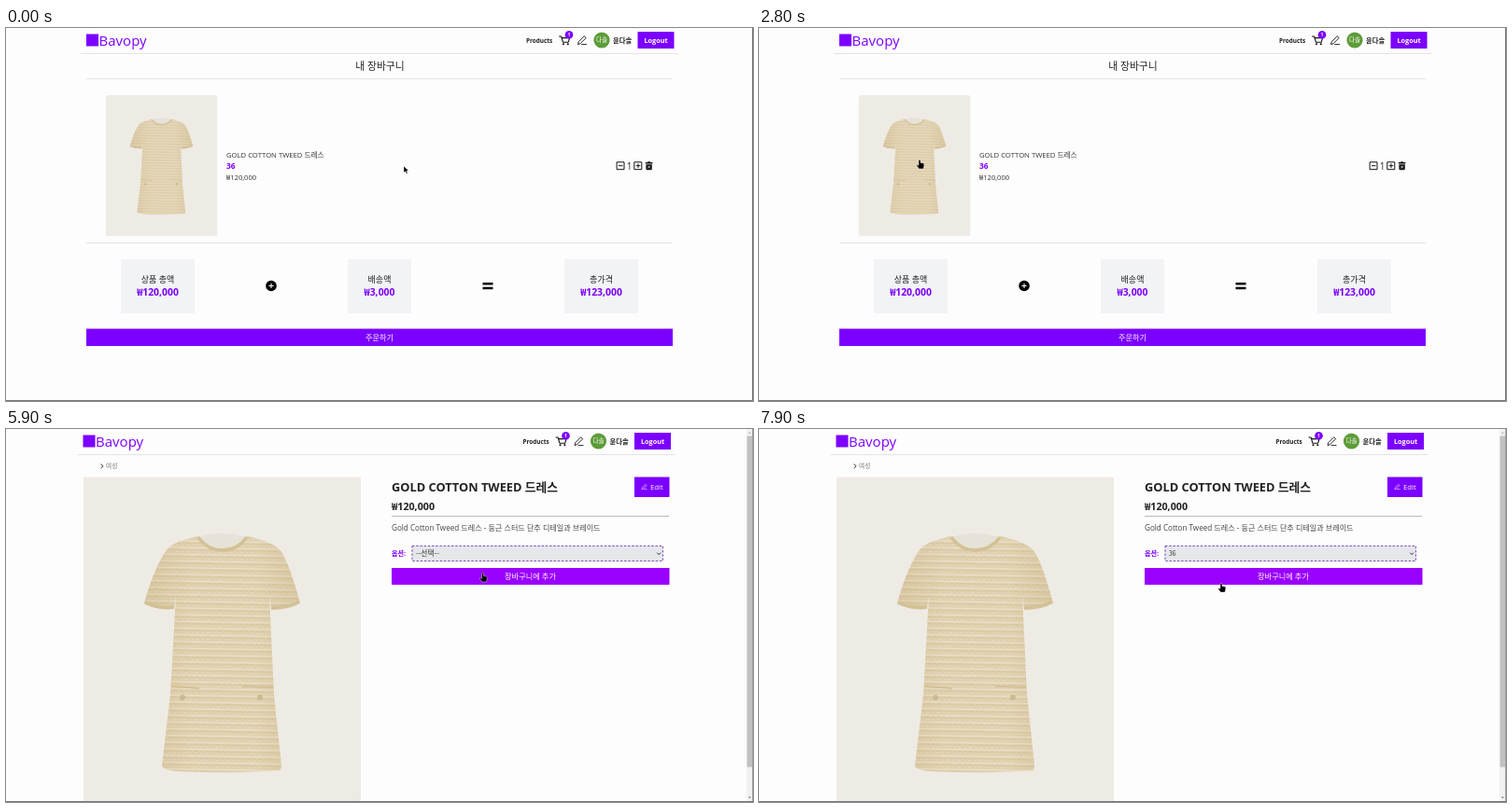
Recreate the animation shown at these times as an HTML page. Size 800x400 px, loop 8000 ms.

```html
<!DOCTYPE html>
<html lang="ko">
<head>
<meta charset="utf-8">
<title>내 장바구니</title>
<style>
html, body { margin: 0; width: 100%; height: 100%; overflow: hidden; background: #fdfdfd; }
svg { display: block; width: 800px; height: 400px; }
text { font-family: "Open Sans", "Noto Sans CJK KR", "Noto Sans", sans-serif; fill: #222; }
.b { font-weight: 700; }
.c { text-anchor: middle; }
.w { fill: #fff; }
.p { fill: #7b00ff; }
.k { font-family: "Noto Sans CJK KR", sans-serif; }
.line { stroke: #e4e4e6; }
.ico { fill: none; stroke: #111; stroke-linecap: round; stroke-linejoin: round; }
#list text { fill: #333; font-size: 6.9px; }
</style>
</head>
<body>
<svg viewBox="0 0 800 400">
  <defs>
    <pattern id="tweed" width="23" height="7.2" patternUnits="userSpaceOnUse" patternTransform="rotate(1)">
      <rect width="23" height="7.2" fill="#dfcfac"/>
      <path d="M0 1.4H23" stroke="#eae1cd" stroke-width="1.5"/>
      <path d="M0 3.6H23" stroke="#d5c199" stroke-width=".9" stroke-dasharray="5 2 3 1.5"/>
      <path d="M0 5.8H23" stroke="#e7dcc3" stroke-width=".9" stroke-dasharray="4 3 2 2.5"/>
    </pattern>
    <linearGradient id="shade">
      <stop offset="0" stop-color="#b79c63" stop-opacity=".22"/>
      <stop offset=".3" stop-color="#b79c63" stop-opacity="0"/>
      <stop offset=".72" stop-color="#b79c63" stop-opacity="0"/>
      <stop offset="1" stop-color="#b79c63" stop-opacity=".22"/>
    </linearGradient>
    <path id="cloth" d="M205 115C186 120 175 123 169 134C159 151 153 169 148 187Q163 195 180 193L182 178L176 285L167 361Q168 366 184 367Q235 370 294 366L295 361L287 285L282 178L284 194Q302 194 315 187C310 168 304 149 297 135C291 123 277 120 259 115Q232 130 205 115Z"/>
    <g id="dress">
      <rect x="83" y="51.5" width="297" height="375" fill="#eeebe5"/>
      <use href="#cloth" fill="url(#tweed)"/>
      <use href="#cloth" fill="url(#shade)"/>
      <path d="M206 116Q232 108 258 116Q247 128 232 128Q216 128 206 116Z" fill="#e6e2d8"/>
      <g fill="none" stroke="#d3c196">
        <path d="M206 116Q216 130 232 130Q248 130 258 116" stroke-width="3.4"/>
        <path d="M149 186Q164 193 180 191M284 192Q301 192 314 185" stroke-width="3.6"/>
        <path d="M177 276L207 278M253 276L286 277" stroke-width="2"/>
      </g>
      <circle cx="189" cy="288" r="3" fill="#cbb98f"/>
      <circle cx="272" cy="288" r="3" fill="#cbb98f"/>
    </g>
    <path id="pen" d="M0 8.6L.7 6 6.6.1 8.6 2 2.7 7.9ZM4 9H9"/>
    <clipPath id="round"><rect x="106.5" y="72" width="120" height="151.5" rx="3"/></clipPath>
  </defs>

  <rect width="800" height="400" fill="#fdfdfd"/>

  <g id="head">
    <path class="line" d="M80 27.5H720"/>
    <rect class="p" x="86" y="6.5" width="13" height="13"/>
    <text class="p" x="99.5" y="19" font-size="15">Bavopy</text>
    <text class="b" x="557" y="16" font-size="6.4">Products</text>
    <path class="ico" stroke-width="1.1" d="M592.5 9H594.6L596.4 15.2H602.2L603.6 10.6H595"/>
    <circle cx="597" cy="17.2" r="1"/><circle cx="601.8" cy="17.2" r="1"/>
    <circle class="p" cx="603" cy="7.3" r="4.3"/>
    <text class="b c w" x="603" y="9.2" font-size="5">1</text>
    <use href="#pen" x="612.6" y="8.6" class="ico" stroke-width=".9"/>
    <circle cx="638" cy="13" r="8.6" fill="#5d9c38"/>
    <text class="c w" x="638" y="15.4" font-size="6.6">다솔</text>
    <text class="b" x="650" y="15.8" font-size="7.3">윤다솔</text>
    <rect class="p" x="676.5" y="4" width="39" height="18"/>
    <text class="b c w" x="696" y="16" font-size="7.3">Logout</text>
  </g>

  <g id="cart">
    <text class="c" x="400.5" y="45" font-size="10.8">내 장바구니</text>
    <path class="line" d="M86 54.5H714M86 230.5H714"/>
    <g clip-path="url(#round)"><use href="#dress" transform="translate(72.97 51.2) scale(.404)"/></g>
    <text x="236" y="139" font-size="7.7" style="fill:#333">GOLD COTTON TWEED 드레스</text>
    <text class="b p" x="236" y="151.3" font-size="8.4">36</text>
    <text x="236" y="162.5" font-size="7.6" style="fill:#333">₩120,000</text>
    <g class="ico">
      <path d="M654.5 143.8H662V151.7H654.5ZM656.4 147.7H660.1"/>
      <path d="M673.2 143.8H680.8V151.7H673.2ZM675.1 147.7H678.9M677 145.8V149.6"/>
    </g>
    <text class="c" x="667.6" y="151.6" font-size="10">1</text>
    <path d="M684.8 144H687L687.6 143.2H689.6L690.2 144H692.4V145.4H684.8ZM685.4 146.2H691.8V151Q691.8 152.2 690.6 152.2H686.6Q685.4 152.2 685.4 151Z" fill="#111"/>
    <path d="M687.4 147.8L689.8 150.4M689.8 147.8L687.4 150.4" stroke="#fff" stroke-width=".7"/>
    <g id="sums"></g>
    <circle cx="284" cy="276.5" r="5.8"/>
    <path d="M281.4 276.5H286.6M284 273.9V279.1" stroke="#fff" stroke-width="1.1"/>
    <path d="M510.5 274.3H521.5M510.5 279.1H521.5" stroke="#000" stroke-width="2.5"/>
    <rect class="p" x="86" y="322.5" width="628" height="18.5"/>
    <text class="c w" x="400" y="334.8" font-size="8.2">주문하기</text>
    <path d="M799.5 0V400" stroke="#777"/>
  </g>

  <g id="item">
    <path class="ico" stroke-width=".9" d="M102 37.8L104 39.8 102 41.8"/>
    <text x="107" y="42.4" font-size="6.7" style="fill:#777">여성</text>
    <use href="#dress"/>
    <text class="b" x="413" y="67" font-size="12.8">GOLD COTTON TWEED 드레스</text>
    <text class="b" x="413" y="87" font-size="10.7">₩120,000</text>
    <path d="M413 93.5H710" stroke="#b9b9bd"/>
    <text x="413" y="109" font-size="8.1" style="fill:#444">Gold Cotton Tweed 드레스 - 둥근 스터드 단추 디테일과 브레이드</text>
    <rect class="p" x="673" y="51.5" width="37.5" height="21.5"/>
    <use href="#pen" transform="translate(681 59.4) scale(.58)" class="ico" style="stroke:#fff"/>
    <text class="w" x="690" y="65.4" font-size="7.8">Edit</text>
    <text class="b p" x="413" y="136.4" font-size="7.1">옵션:</text>
    <rect id="box" x="435" y="125.4" width="268.4" height="16.2" fill="#e5e7eb" stroke-width=".9" stroke-dasharray="2.5 1.7"/>
    <text id="pick" class="k" x="439" y="136.3" style="fill:#333"></text>
    <path class="ico" stroke-width=".9" d="M697.6 133L699.2 134.6 700.8 133"/>
    <rect id="add" x="413" y="149" width="297.5" height="18"/>
    <text class="c w" x="561.5" y="161.2" font-size="8.2">장바구니에 추가</text>
    <g id="list">
      <rect x="434.7" y="142.6" width="268" height="69.4" rx="1" fill="#f7f8f8" stroke="#a5a5a8"/>
      <rect id="row" x="436" width="265.5" height="13" fill="#dcdcde"/>
      <text class="k" x="439" y="153.6" style="font-size:7.7px">--선택--</text>
    </g>
    <rect x="793" width="7" height="400" fill="#f1f1f1"/>
    <rect x="793.6" y="7.5" width="5.4" height="355" fill="#c1c1c1"/>
    <path d="M795 4.8L796.4 3.2 797.8 4.8Z" fill="#a3a3a3"/>
    <path d="M795 394.6L796.4 396.2 797.8 394.6Z" fill="#666"/>
    <path d="M799.6 0V400" stroke="#888" stroke-width=".8"/>
  </g>

  <path d="M0 399.5H800" stroke="#777"/>

  <g id="cursor" stroke="#fff" stroke-width=".4">
    <path id="arrow" d="M0 0V7.2L1.7 5.7 2.9 8.3 4.1 7.8 2.9 5.3H5.2Z"/>
    <path id="hand" d="M-1 .9Q0 -.5 1 .9V3.5L4 4.1Q5 4.5 4.9 6L4 10H-.6L-3 6.8Q-3.2 5.4 -2 5.6L-1 6.5Z"/>
  </g>
</svg>
<script>
const $ = id => document.getElementById(id);
const LOOP = 8000, STEP = 100;
const OPENED = 3100, LIST_ON = 6800, LIST_OFF = 7900;

// Pointer tip: time, x, y
const path = [
  [0, 426, 148], [400, 426, 148], [900, 372, 155], [1300, 300, 156],
  [1800, 223, 144], [1900, 213.5, 143.5], [2300, 186, 142], [2600, 172, 141],
  [4000, 172, 141], [4500, 202, 142], [4900, 214, 143], [5200, 262, 147],
  [5600, 440, 156], [5800, 500, 155], [5900, 510.5, 154], [6100, 506, 148],
  [6400, 497, 137], [6800, 495, 137], [6900, 495, 165], [8000, 495, 165]
];

$('sums').innerHTML = [
  [123, 79, '상품 총액', '₩120,000'],
  [366, 68, '배송액', '₩3,000'],
  [598, 79, '총가격', '₩123,000']
].map(([x, w, label, price]) => `
  <rect x="${x}" y="248" width="${w}" height="58" fill="#f1f3f5"/>
  <text class="c" x="${x + w / 2}" y="272.6" font-size="9">${label}</text>
  <text class="b c p" x="${x + w / 2}" y="286.6" font-size="10.4">${price}</text>`).join('');

$('list').insertAdjacentHTML('beforeend', [36, 38, 40, 42]
  .map((n, i) => `<text x="439" y="${166.6 + i * 13.1}">${n}</text>`).join(''));

function pointer(t) {
  const i = path.findIndex(p => p[0] > t);
  const [t0, x0, y0] = path[i - 1], [t1, x1, y1] = path[i];
  const k = (t - t0) / (t1 - t0);
  return [x0 + (x1 - x0) * k, y0 + (y1 - y0) * k];
}

const show = (id, on) => $(id).setAttribute('display', on ? 'inline' : 'none');

function draw(now) {
  const t = Math.floor(now % LOOP / STEP) * STEP;
  const [x, y] = pointer(t);
  const item = t >= OPENED, open = t >= LIST_ON && t < LIST_OFF, picked = t >= LIST_OFF;
  const overAdd = item && !open && x > 413 && y >= 149 && y < 167;
  const hand = item ? overAdd : x < 227;

  show('cart', !item);
  show('item', item);
  show('list', open);
  show('hand', hand);
  show('arrow', !hand);
  $('head').setAttribute('transform', `translate(${item ? -3.5 : 0})`);
  $('add').setAttribute('fill', overAdd ? '#9a00ff' : '#7b00ff');
  $('box').setAttribute('stroke', open ? '#4a1a8c' : '#6a35b0');
  $('row').setAttribute('y', y > 157 ? 157.7 : 144.5);
  $('pick').textContent = picked ? '36' : '--선택--';
  $('pick').setAttribute('font-size', picked ? 6.9 : 7.7);
  $('cursor').setAttribute('transform', `translate(${x} ${y})`);
}

const start = performance.now();
function tick() {
  draw(performance.now() - start);
  requestAnimationFrame(tick);
}
tick();
</script>
</body>
</html>
```
